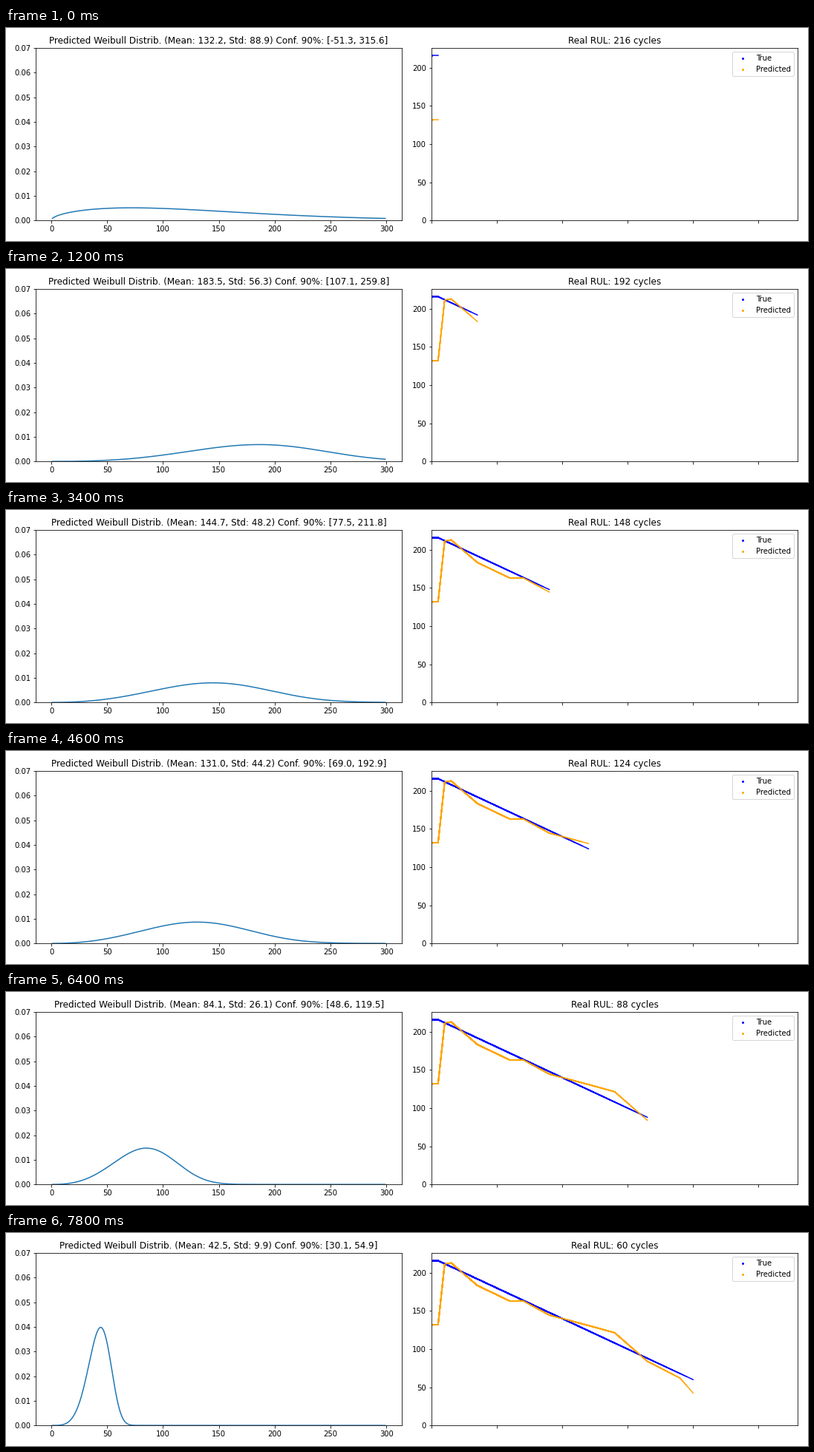
Recreate the animation shown at these times as a matplotlib script. Size 1080 by 288 pixels, loop 8000 ms.

```python
import math

import matplotlib.pyplot as plt
import numpy as np
from matplotlib.animation import FuncAnimation

WIDTH, HEIGHT, DPI = 1080, 288, 72
FRAMES, INTERVAL = 40, 200

plt.rcParams["font.family"] = "DejaVu Sans"

# Turning points of the prediction: step -> value, straight in between
MEAN_KEYS = {1: 132.16, 2: 211.5, 3: 213, 7: 183.453, 12: 162.94, 14: 163.5,
             18: 144.66, 24: 130.96, 28: 121.5, 33: 84.06, 38: 62, 40: 42.5}
STD_KEYS = {1: 88.92, 2: 63, 7: 56.347, 12: 51.12,
            18: 48.18, 24: 44.22, 33: 26.08, 40: 9.9}


def through(keys, steps):
    return np.interp(steps, list(keys), list(keys.values()))


STEPS = np.arange(FRAMES + 1)
MEANS = through(MEAN_KEYS, STEPS)
STDS = through(STD_KEYS, STEPS)
TRUE_RUL = 216 - 4 * np.maximum(STEPS - 1, 0)
CYCLES = np.arange(1, 300)


def variation(shape):
    """Standard deviation over mean of a Weibull distribution."""
    g1, g2 = math.gamma(1 + 1 / shape), math.gamma(1 + 2 / shape)
    return math.sqrt(g2 / g1 ** 2 - 1)


def weibull_shape(spread):
    """Shape whose variation equals spread, by bisection."""
    low, high = 0.5, 30.0
    for _ in range(60):
        mid = (low + high) / 2
        if variation(mid) > spread:
            low = mid
        else:
            high = mid
    return low


def weibull_pdf(x, mean, shape):
    scale = mean / math.gamma(1 + 1 / shape)
    z = x / scale
    return shape / scale * z ** (shape - 1) * np.exp(-z ** shape)


def add_axes(left):
    return fig.add_axes([left / WIDTH, 27.9 / HEIGHT, 493 / WIDTH, 233 / HEIGHT])


fig = plt.figure(figsize=(WIDTH / DPI, HEIGHT / DPI), dpi=DPI, facecolor="white")

dist_ax = add_axes(40.1)
dist_ax.set_xlim(-13.9, 313.9)
dist_ax.set_ylim(0, 0.07)
dist_ax.set_xticks(range(0, 301, 50))
dist_ax.set_yticks(np.arange(8) / 100)
curve, = dist_ax.plot([], [], color="C0")
dist_title = dist_ax.set_title("")

rul_ax = add_axes(573.1)
rul_ax.set_xticks(range(0, 51, 10), labels=[])
rul_ax.set_yticks(range(0, 201, 50))
series = [(TRUE_RUL, "blue", "True"), (MEANS, "orange", "Predicted")]
for values, color, label in series:
    rul_ax.plot(0, values[0], ".", markersize=4, color=color, label=label)
rul_ax.legend(loc="upper right")
rul_title = rul_ax.set_title("")

# Every step redraws the whole history, so older segments look heavier
history = [[rul_ax.plot(STEPS[:n], values[:n], color=color)[0]
            for values, color, _ in series]
           for n in range(2, FRAMES + 2)]
rul_ax.set_xlim(0, 56)
rul_ax.set_ylim(0, 226)


def update(frame):
    step = frame + 1
    mean, std = MEANS[step], STDS[step]
    shape = weibull_shape(std / mean)
    half = std * math.log(20) ** (1 / shape)

    curve.set_data(CYCLES, weibull_pdf(CYCLES, mean, shape))
    dist_title.set_text(
        f"Predicted Weibull Distrib. (Mean: {mean:.1f}, Std: {std:.1f}) "
        f"Conf. 90%: [{mean - half:.1f}, {mean + half:.1f}]")
    rul_title.set_text(f"Real RUL: {TRUE_RUL[step]} cycles")
    for i, lines in enumerate(history):
        for line in lines:
            line.set_visible(i <= frame)
    return []


anim = FuncAnimation(fig, update, frames=FRAMES, interval=INTERVAL,
                     repeat=True, repeat_delay=0)
plt.show()
```
